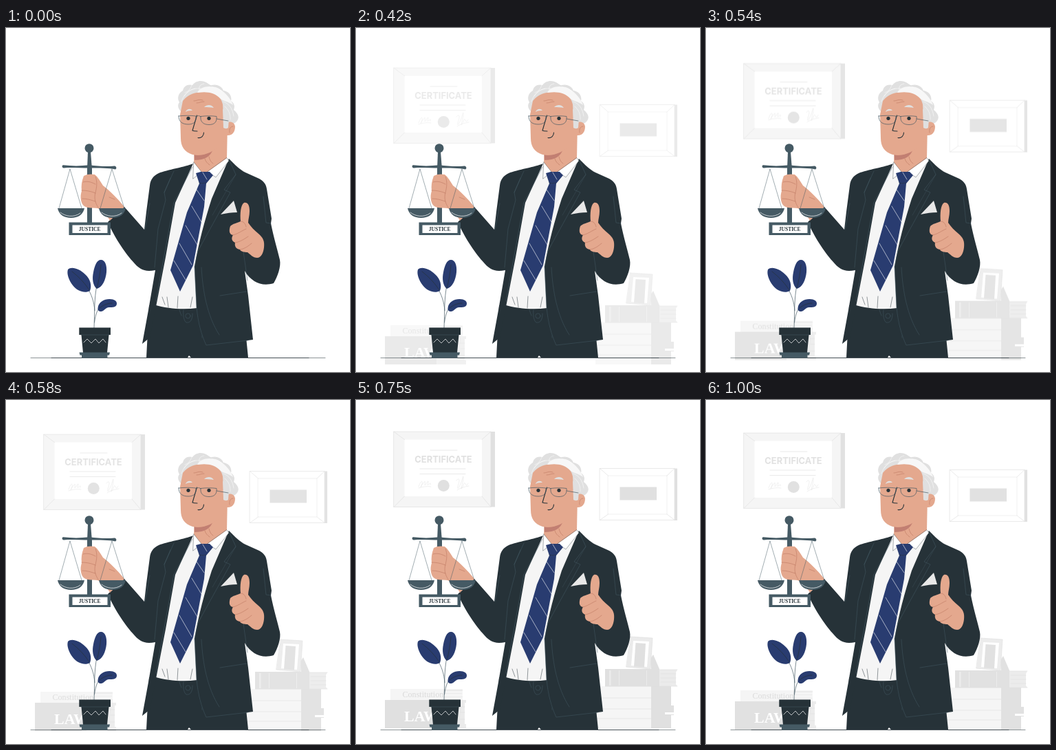
Write an HTML page that moves like this. It is 500 px wide and 500 px high and loops after 1.04 s.

```html
<!DOCTYPE html>
<html lang="en">
<head>
<meta charset="utf-8">
<title>Justice</title>
<style>
  html, body { margin: 0; width: 100%; height: 100%; overflow: hidden; background: #fff; }
  svg { display: block; width: 100vw; height: 100vh; }
  .suit { fill: #263238; }
  .steel { fill: #455a64; }
  .skin { fill: #e4a88e; }
  .navy { fill: #293c70; }
  .hair { fill: #e0e0e0; }
  .grey { fill: #e0e0e0; }
  .pale { fill: #ebebeb; }
  .faint { fill: #f5f5f5; }
  .white { fill: #fff; }
  .line { fill: none; stroke-width: .7; stroke-linecap: round; stroke-linejoin: round; }
  .thin { stroke-width: .5; }
  .thick { stroke-width: 1.1; }
  .seam { stroke: #455a64; }
  .ink { stroke: #263238; }
  .crease { stroke: #b9745f; stroke-width: .55; }
  .rim { stroke: #e0e0e0; }
  .gleam { stroke: #fff; }
  .serif { font-family: "Liberation Serif", serif; }
  .sans { font-family: Inter, sans-serif; }
  .bold { font-weight: 700; }
</style>
</head>
<body>
<svg viewBox="0 0 500 500">
  <g id="backdrop" opacity="0">
    <!-- certificate -->
    <path class="grey" d="M196 46h6v109.500h-6z"/>
    <path class="faint" d="M55 46h141v109.500H55z"/>
    <path class="white" d="M70.500 57.500h112.500v82.500H70.500z"/>
    <path class="line rim" d="M55 46h141v109.500H55zM55 46l15.500 11.500M196 46l-13 11.500M55 155.500l15.500-15.500M196 155.500l-13-15.500"/>
    <path class="line rim" d="M108 73h39M93 100h66M93 107.500h66"/>
    <text class="sans bold grey" x="127" y="91" font-size="12.900" text-anchor="middle">CERTIFICATE</text>
    <circle class="grey" cx="127.300" cy="124.500" r="8.500"/>
    <path class="line thin rim" d="M91 126c3-9 6-10 5-4s-4 6 0 1 5-7 4-1 4-5 5-4-3 7 0 5 4-4 3 0M91 128c6-2 12-3 18-2M146 117c4-5 5-1 3 5s-2 10 2 2 5-17 5-11-5 20-2 15 3-10 5-6 2 2 4-1M147 131c4-3 10-5 17-6"/>

    <!-- plaque -->
    <path class="grey" d="M463 99.500h4v75.500h-4z"/>
    <path class="line rim" d="M354.500 99.500H463V174.500H354.500zM354.500 99.500l12 10.500M463 99.500l-11 10.500M354.500 174.500l12-8.500M463 174.500l-11-8.500"/>
    <path class="line rim" stroke-opacity=".6" d="M366.500 110H452v56h-85.500z"/>
    <path class="grey" d="M383.500 126.500h53.500V145.500h-53.500z"/>

    <!-- books on the left -->
    <path class="faint" d="M50 420h105v16H50z"/>
    <path class="pale" d="M128 421h27v2h-27zM128 426h26v1h-26zM128 431h27v1h-27z"/>
    <text class="serif" fill="#dadada" x="67.500" y="431.500" font-size="12.100">Constitution</text>
    <path class="grey" d="M42 436h75v41H42z"/>
    <path class="pale" d="M117 436h43v4h-2v31h2v6h-43z"/>
    <path class="line rim" d="M150 446h8M152 454h6M150 464h8"/>
    <text class="serif bold white" x="70" y="466.500" font-size="22">LAW</text>

    <!-- books and picture on the right -->
    <path class="faint" d="M348 416h81v61h-81z"/>
    <path class="grey" d="M429 416h29v28h4v14h-4v19h-29z"/>
    <path class="white" d="M449 454h13v3h-13z"/>
    <path class="line rim" d="M350 433h79M350 449h79M350 463h79"/>
    <path class="grey" d="M362 391h79v25.500h-79z"/>
    <path class="pale" d="M441 392h26l-2 4v17l2 3h-26zM368 393h2.500v22H368zM382 393h1v22h-1zM422 393h1v22h-1z"/>
    <path class="line rim" d="M441 392h26M443 398h22M443 404h22M443 410h22M441 416h26"/>
    <path class="grey" d="M428 376l4-6 9 21h-12z"/>
    <path class="pale" d="M399 344l32 2-3 45-35-3z"/>
    <path class="line rim" d="M399 344l32 2-3 45-35-3z"/>
    <path class="white" d="M403 350l23 1-3 37-23-2z"/>
    <path class="grey" d="M406.500 353l14.500 1-2 34.500-15-1z"/>
  </g>

  <path class="line ink" stroke-opacity=".75" d="M36 479.500H464"/>
  <path class="line ink" d="M66 479.500H440"/>

  <!-- plant -->
  <g>
    <path class="line seam" d="M128 436c1-24 0-42 4-62M128.500 428c2-15 6-23 12-24M129 411c-1-14-5-24-11-34"/>
    <path class="navy" d="M90 351c5-5 17-1 25 7 8 7 10 17 7 24-7 4-18 1-25-8-6-8-9-17-7-23z"/>
    <path class="navy" d="M138 337c6 0 9 8 8 18-1 11-6 22-14 24-6-5-7-15-5-24 2-10 5-18 11-18z"/>
    <path class="navy" d="M133.500 407c1-9 9-13 17-13 7 0 11 3 10.500 7-.5 5-6 5-11 5-6 0-7 6-12 6-3 0-5-2-4.500-5z"/>
    <path class="line ink" d="M96 354c9 7 19 17 25 27M138 344c-1 12-3 23-6 34M136 407c5-4 11-7 18-7"/>
    <path class="suit" d="M106.300 435.400H152V446h-2.500l-2.500 26H112l-2.500-26h-3.200z"/>
    <path class="steel" d="M106.500 471.500H151l-1 4h-2.500v4H110v-4h-2.500z"/>
    <path class="line gleam" d="M113 457l5-5 6 6 6-6 5 6 6-6 4 5"/>
    <path class="line thin seam" d="M109 446h40"/>
  </g>

  <!-- body -->
  <path class="suit" d="M208 403l-4 76h60l2-3 3 3h83l-8-79z"/>
  <path d="M273 195l49-5-16 52-27 103v65l-31 2-30-8 13-74 16-85z" fill="#f5f5f5"/>
  <path class="line ink" stroke-opacity=".7" d="M227 391l4 11M234 391l2 15M250 390l-1 17M271 391l-3 15"/>
  <path class="suit" d="M216 402.500c18 5 40 7.500 62 4.500v10h-66z"/>
  <path class="line thin seam" d="M258 410c-1 9 1 16 4 18 6 1 9-4 9-13M252 410l3 8M286 428l-1 22"/>
  <circle class="line thin seam" cx="264.500" cy="418.500" r="3.600"/>

  <!-- jacket -->
  <path class="suit" d="M272 197c-11 5-38 9-50 14-8 4-12 9-13 18l-5 38-3 26-29-33-24 22c8 19 24 44 36 57 10 12 17 16 33 13l-10 58-9 49 11-9 9-45 14-72 14-79z"/>
  <path class="suit" d="M324 190c10 10 16 16 24 20l20 9c7 4 10 8 11 15l7 43-1 7c4 20 10 40 13 53 2 9-3 24-9 34-10 3-20 2-28-3-6-4-11-9-14-15l5 36 7 64c-25 3-45 7-68 9-8-17-13-35-14-53l-3-62c6-35 15-68 25-99z"/>
  <path class="line thin seam" d="M244 208l-14 31 2 11-11 42-5 56M271 202l-27 52-12 66-14 77M209 255l-7 38M239 218l-9 21"/>
  <path class="line thin seam" d="M324 191l10 22-17 22 9 4-47 85-5 23 3 59c2 22 7 40 14 55l61-7M311 389l39-6M374 245l4 38 7 1M284 348c2 34 8 70 26 98M345 325l6 42"/>
  <path class="line thin seam" stroke-opacity=".7" d="M334 213l-34 59"/>
  <path fill="#e8e8e8" d="M312 271l19-20 5 17c-8 0-15 1-24 3z"/>

  <!-- neck and tie -->
  <path class="skin" d="M274 174l-1 22 11 13 12 1 25-21 1-50-30 5z"/>
  <path d="M273.500 184c8 2 18 0 27-7-3 9-11 15-26.500 15z" fill="#c27f72"/>
  <path class="line crease" d="M289 190c1 4 4 7 7 9M295 187c1 5 3 8 6 10"/>
  <path class="white" d="M273 195l11 14-12 10zM321 189l3 4-19 24-12-8z"/>
  <path class="line thin ink" stroke-opacity=".75" d="M273 195l11 14-12 10zM321 189l3 4-19 24-12-8z"/>
  <path class="navy" d="M276 211l7-2 13 0 5 5-10 12-3 34-16 85-19 38-14-31 24-84 18-42z"/>
  <path class="line thin ink" d="M281 225c3 1 6 1 10 0"/>
  <path class="line gleam" stroke-opacity=".85" d="M286 210l6 10M277 235l11 16M270 259l14 23M261 287l17 28M252 313l18 31M244 338l17 28"/>

  <!-- head -->
  <path class="hair" d="M257 123c-6-3-9-10-5-15-4-6-1-14 5-17 1-7 8-10 14-8 4-6 13-8 20-4 4 2 6 5 8 4 8-2 15 2 17 8 8 1 13 8 11 15 5 3 6 8 4 13 6 5 8 10 6 14-2 5-8 8-14 5l-7 9-7-2-4-40z"/>
  <path class="skin" d="M257 106c8-10 18-13 31-13 15 0 24 5 27 18l2 33 4-6c4-3 11-2 12 5 0 8-4 14-12 13-5 12-10 17-18 21-10 7-21 9-32 7-12-4-17-12-17-24l-1-34z"/>
  <path class="hair" d="M315 117l9 16-1 12c-3 2-5 1-7 0z"/>
  <path d="M278 94c5-11 24-12 36-3 8 6 14 15 16 21-8-6-13-5-18-9-9-9-18-11-34-9z" fill="#f7f7f7"/>
  <path class="line thin gleam" d="M255 107c4-12 11-17 20-19M259 99c6-9 14-12 24-11M281 90c-1-5 1-8 7-9M316 107c8 3 13 9 15 21M318 114c6 5 8 11 8 19M313 92c-4-5-8-6-14-6M270 83c-2 6-5 9-10 11"/>
  <path class="hair" d="M261 122c1-4 7-6 10-2-3 0-7 0-10 2zM288 115c4-4 11-4 14 1-5-1-9-1-14-1z"/>
  <path class="line crease" d="M273 106c4 0 7-3 13-1M277 109c4 0 6-2 11-2M330 143c-4 0-6 4-5 9"/>
  <g class="suit">
    <circle cx="265" cy="131.300" r="2.600"/>
    <circle cx="295" cy="131.300" r="2.600"/>
  </g>
  <path class="line thick ink" d="M277.500 127l-6.500 22c2 1 4 1 7 1M279 159.500c5 1 8.500-3 8.500-7.500"/>
  <path class="line seam" d="M251 128c8-1 17-1 25 0 1 8-3 12-11 12s-14-3-14-12zM283 128.500c8-1 16-1 23 0 1 8-3 12-11 12s-13-4-12-12zM276 129c2-2 5-2 7 0M306 132l17 3"/>

  <!-- thumb up -->
  <path class="skin" d="M341 281c-1-11 0-24 5-27 5-1 8 3 8 12 0 7-2 12-2 17 4 6 9 11 15 16 7 6 9 11 8 20-1 8-4 15-10 15-6 0-10-5-14-8-4 0-10-1-11-4-6-1-8-5-7-10-5-2-6-7-3-11-6-1-6-7-4-13 4-4 9-4 15-7z"/>
  <path class="line crease" d="M329 301c7-1 13-6 20-9M333 312c7-1 13-5 19-9M340 322c7-1 12-5 17-9M341 281c4 0 7 3 8 8"/>

  <!-- scales -->
  <g class="steel">
    <circle cx="121" cy="174.700" r="6.500"/>
    <path d="M119 180h4l2 25v78h-7v-78z"/>
    <path d="M83 199.300c13 1.500 25 1.500 38 0 13 1.500 25 2.500 37 1.200 3 1 3 4 1 5-9-2-23-2-38-2s-27-1-37 0c-3-.5-3-3.500-1-4.200z"/>
    <path d="M91.500 282.500H152V301H91.500z"/>
  </g>
  <path class="skin" d="M113 215c5-3 11-3 16-2 5 4 8 10 12 16 9 7 20 17 31 31l-21 20c-4-7-9-15-18-18-7-1-18 1-22-6-3-6-3-13-1-19-1-8 0-14 3-22z"/>
  <path class="line crease" d="M112 224c7-2 12 0 18 3M110 236c6 0 13 1 20 4M111 248c7 0 12 2 19 4M130 216c3 8 2 15 0 23s-1 14 4 22M150 246l8 3"/>
  <path class="line thin seam" d="M93 205l-16 57M93 205l17 57M154 205l-17 57M154 205l18 57"/>
  <g id="pans"></g>
  <path class="white" d="M96.500 286.500H147.500V298h-51z"/>
  <text class="serif bold suit" x="121.700" y="294.700" font-size="7.500" text-anchor="middle">JUSTICE</text>
</svg>
<script>
  const LOOP = 1040, RISE = 36;

  document.getElementById("pans").innerHTML = [75, 135].map(x => `
    <path class="steel" d="M${x} 262h39c-2 9-9 14-19.500 14S${x + 2} 271 ${x} 262z"/>
    <path class="line gleam" d="M${x + 4} 268c7 6 20 8 29 1"/>`).join("");

  // [time in ms, distance below the resting place]
  const steps = [
    [0, RISE], [330, 18], [380, 15], [420, 12], [460, 9.6], [500, 7.5], [540, 5.6],
    [580, 4], [630, 2.5], [670, 1.4], [710, .6], [750, 0],
    [920, .3], [960, 1], [1000, 2], [LOOP, 2]
  ];

  const frames = steps.map(([time, drop]) => ({
    offset: time / LOOP,
    transform: `translateY(${drop}px)`,
    opacity: 1 - drop / RISE,
    easing: "steps(1, end)"
  }));

  document.getElementById("backdrop").animate(frames, { duration: LOOP, iterations: Infinity });
</script>
</body>
</html>
```
